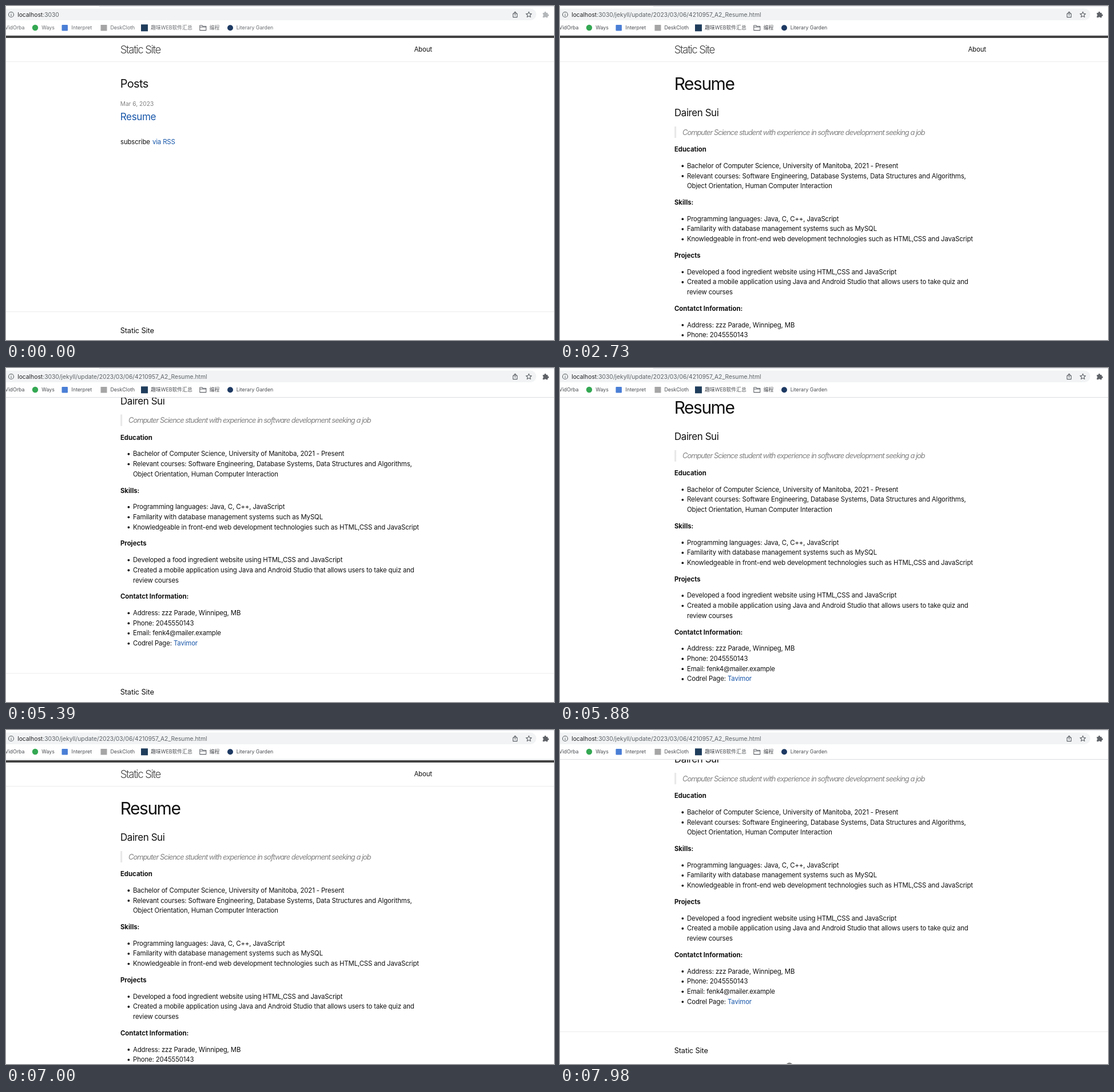
Write an HTML page that moves like this. It is 958 by 585 pixels and loops after 8000 ms.

```html
<!DOCTYPE html>
<html lang="en">
<head>
<meta charset="utf-8">
<title>Static Site</title>
<style>
  html, body { margin: 0; width: 100%; height: 100%; overflow: hidden; background: #fff; }
  svg { display: block; width: 958px; height: 585px; }
  text { font-family: Inter, "Noto Sans CJK SC", "Noto Sans CJK", sans-serif; fill: #111; white-space: pre; }
  .body { font-size: 11.4px; letter-spacing: -.13px; }
  .bold { font-size: 11.4px; font-weight: 700; }
  .site { font-size: 18.6px; font-weight: 300; letter-spacing: -1.38px; fill: #424242; }
  .foot { font-size: 12.85px; letter-spacing: -.17px; }
  .h1 { font-size: 30px; letter-spacing: -1.5px; }
  .h2 { font-size: 20px; letter-spacing: -.65px; }
  .h3 { font-size: 17px; letter-spacing: -.45px; }
  .post { font-size: 17.1px; letter-spacing: -.38px; }
  .date { font-size: 10.2px; fill: #828282; }
  .quote { font-size: 12.85px; font-style: italic; letter-spacing: -.97px; fill: #828282; }
  .link { fill: #1756a9; }
  .url { font-size: 10.3px; fill: #5f6368; }
  .host { fill: #202124; }
  .mark { font-size: 8.8px; fill: #4a4d51; }
  .idle .mark { fill: #6a6d71; }
  .icon { fill: none; stroke: #5f6368; stroke-width: 1.1; stroke-linejoin: round; stroke-linecap: round; }
  .puzzle { fill: #5f6368; }
  .idle .puzzle { fill: #b4b7ba; }
</style>
</head>
<body>
<svg id="stage" viewBox="0 0 958 585"></svg>
<script>
const LOOP = 8000, STEP = 70, FOCUS = 490, OPEN = 2590;
const LEFT = 199.7, LINE = 17.7, GAP = 28.75;

const text = (x, y, cls, str, more = '') => `<text x="${x}" y="${y}" class="${cls}" ${more}>${str}</text>`;
const rect = (x, y, w, h, fill, r = 0) => `<rect x="${x}" y="${y}" width="${w}" height="${h}" rx="${r}" fill="${fill}"/>`;
const dot = (x, y, r, fill) => `<circle cx="${x}" cy="${y}" r="${r}" fill="${fill}"/>`;
const path = (d, cls) => `<path d="${d}" class="${cls}"/>`;

function frame(footY) {
  return rect(0, 52, 958, 4, '#424242') +
    text(LEFT, 82.8, 'site', 'Static Site') +
    text(713.4, 80.3, 'body', 'About') +
    rect(0, 97, 958, .8, '#e8e8e8') +
    rect(0, footY, 958, .8, '#e8e8e8') +
    text(LEFT, footY + 37.5, 'foot', 'Static Site') +
    dot(401, footY + 60.6, 6, '#828282');
}

function homePage() {
  return frame(535) +
    text(LEFT, 143.3, 'h2', 'Posts') +
    text(LEFT, 175.3, 'date', 'Mar 6, 2023') +
    text(LEFT, 200, 'post link', 'Resume') +
    text(LEFT + .3, 241.7, 'body', 'subscribe') +
    text(255.9, 241.7, 'body link', 'via RSS');
}

// A leading tab marks a wrapped line without a bullet.
const sections = [
  ['Education',
    'Bachelor of Computer Science, University of Manitoba, 2021 - Present',
    'Relevant courses: Software Engineering, Database Systems, Data Structures and Algorithms,',
    '\tObject Orientation, Human Computer Interaction'],
  ['Skills:',
    'Programming languages: Java, C, C++, JavaScript',
    'Familarity with database management systems such as MySQL',
    'Knowledgeable in front-end web development technologies such as HTML,CSS and JavaScript'],
  ['Projects',
    'Developed a food ingredient website using HTML,CSS and JavaScript',
    'Created a mobile application using Java and Android Studio that allows users to take quiz and',
    '\treview courses'],
  ['Contatct Information:',
    'Address: zzz Parade, Winnipeg, MB',
    'Phone: 2045550143',
    'Email: fenk4@mailer.example',
    'Codrel Page: <tspan class="link">Tavimor</tspan>']
];

function resumePage() {
  let out = frame(664) +
    text(LEFT, 147, 'h1', 'Resume') +
    text(LEFT + .3, 193, 'h3', 'Dairen Sui') +
    rect(200.2, 211, 3, 20, '#e8e8e8') +
    text(214, 225.5, 'quote', 'Computer Science student with experience in software development seeking a job');
  let y = 255.1;
  for (const [title, ...lines] of sections) {
    out += text(LEFT + .2, y, 'bold', title);
    y += GAP;
    lines.forEach((line, i) => {
      if (i) y += LINE;
      if (line[0] !== '\t') out += dot(214.4, y - 3.6, 1.9, '#111');
      out += text(222, y, 'body', line.trim());
    });
    y += GAP;
  }
  return out;
}

function starPath(cx, cy, r) {
  let d = '';
  for (let i = 0; i < 10; i++) {
    const a = i * Math.PI / 5 - Math.PI / 2, k = i % 2 ? r * .45 : r;
    d += (i ? 'L' : 'M') + (cx + k * Math.cos(a)).toFixed(2) + ' ' + (cy + k * Math.sin(a)).toFixed(2);
  }
  return d + 'Z';
}

function toolbar() {
  const mark = (x, str) => text(x, 41.3, 'mark', str);
  return rect(0, 0, 958, 52, '#fff') +
    rect(163, 0, 795, 1, '#dee1e6') +
    rect(-20, 4.5, 947, 20.5, '#f1f3f4', 10.2) +
    rect(0, 51, 958, 1, '#dcdee1') +
    '<circle cx="9" cy="15" r="4.5" class="icon"/>' +
    path('M9 14.8V17.2M9 12.7V12.8', 'icon') +
    text(20.2, 18.5, 'url', '<tspan class="host">localhost</tspan>:3030<tspan id="route"></tspan>') +
    path('M888.3 13.4H886.4V19.6H893.6V13.4H891.7M890 16.8V10.2M888 12.2L890 10.2L892 12.2', 'icon') +
    path(starPath(914, 15.3, 5.2), 'icon') +
    path('M938.5 12H941.2A1.6 1.6 0 1 1 944.2 12H947V14.6A1.6 1.6 0 1 1 947 17.6V20.3H944.2A1.6 1.6 0 0 0 941.2 20.3H938.5V17.6A1.6 1.6 0 0 0 938.5 14.6Z', 'puzzle') +
    text(32.5, 41.3, 'mark', 'VidOrba', 'text-anchor="end"') +
    dot(51, 38, 5.2, '#34a853') + mark(62.3, 'Ways') +
    rect(97.5, 33, 10.5, 10.5, '#4a7fd6', 1) + mark(114.6, 'Interpret') +
    rect(165.5, 33, 11, 10.5, '#a5a5a5') + mark(182.4, 'DeskCloth') +
    rect(236, 32.3, 12, 12, '#1f3d5c') + mark(253.2, '趣味WEB软件汇总') +
    path('M338.8 42.6V34H342.6L344 35.5H349.8V42.6ZM338.8 37H349.8', 'icon') + mark(355.8, '编程') +
    dot(392, 38.2, 5, '#1e3a63') + mark(402.7, 'Literary Garden');
}

const stage = document.getElementById('stage');
stage.innerHTML = `<g id="home">${homePage()}</g><g id="resume">${resumePage()}</g><g id="bar">${toolbar()}</g>`;
const [home, resume, bar, route] = ['home', 'resume', 'bar', 'route'].map(id => document.getElementById(id));

const ease = {
  both: p => p * p * (3 - 2 * p),
  in: p => p * p,
  out: p => 1 - (1 - p) ** 2
};

// [time, scroll offset, easing towards this key]
const homeKeys = [[1470, 0], [1750, 3], [1820, 3], [2240, 0]];
const resumeKeys = [
  [3780, 0], [4060, 14], [4410, 14], [4480, 20.6], [4760, 128.8, 'out'], [5040, 129.5],
  [5390, 129.5], [6090, 50], [6160, 50], [6300, 37, 'in'], [6600, -6, 'out'], [7000, -1],
  [7840, 135.6], [7980, 136]
];

function scrollAt(keys, t) {
  if (t <= keys[0][0]) return keys[0][1];
  const i = keys.findIndex(k => k[0] >= t);
  if (i < 0) return keys[keys.length - 1][1];
  const [t0, s0] = keys[i - 1], [t1, s1, kind = 'both'] = keys[i];
  return s0 + (s1 - s0) * ease[kind]((t - t0) / (t1 - t0));
}

function show(page, on, offset) {
  page.setAttribute('display', on ? 'inline' : 'none');
  page.setAttribute('transform', `matrix(1 0 0 1 0 ${-offset})`);
}

function draw(now) {
  const t = Math.floor(now % LOOP / STEP) * STEP;
  const open = t >= OPEN;
  show(home, !open, scrollAt(homeKeys, t));
  show(resume, open, scrollAt(resumeKeys, t));
  bar.setAttribute('class', t < FOCUS ? 'idle' : '');
  route.textContent = open ? '/jekyll/update/2023/03/06/4210957_A2_Resume.html' : '';
}

const start = performance.now();
function tick() {
  draw(performance.now() - start);
  requestAnimationFrame(tick);
}
tick();
</script>
</body>
</html>
```
